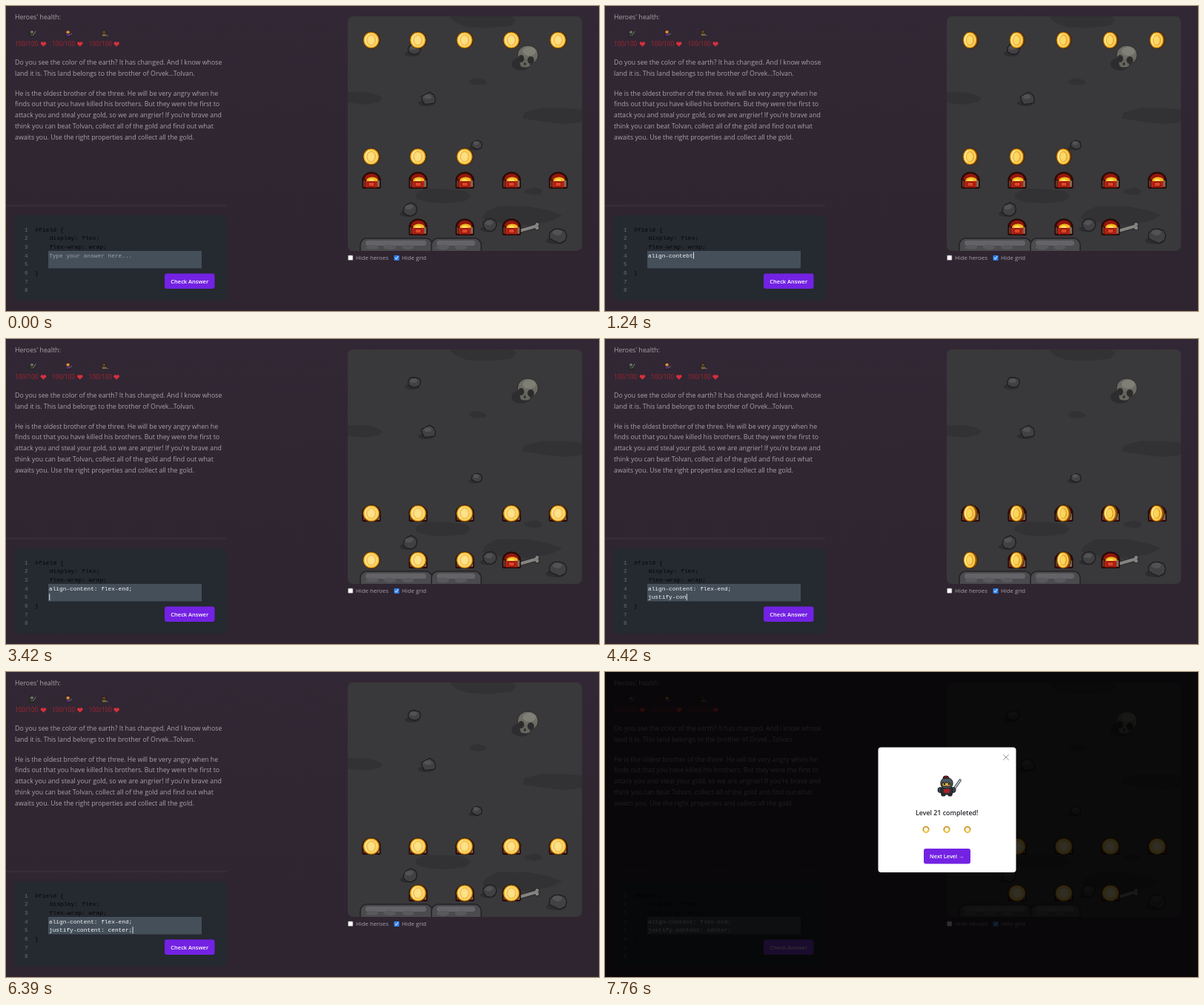
Animation, 800 px wide and 411 px high, one loop 7790 ms. Source, as an HTML page with a canvas:

```html
<!DOCTYPE html>
<html lang="en">
<head>
<meta charset="utf-8">
<title>Flex level</title>
<style>
html, body { margin: 0; width: 100%; height: 100%; overflow: hidden; background: #302632; }
canvas { display: block; width: 800px; height: 411px; }
</style>
</head>
<body>
<canvas id="stage" width="800" height="411"></canvas>
<script>
const LOOP = 7790;
const MOVE_DOWN = 2696, CENTER = 6205, CLICK = 6850, BURST = 7000, DONE = 7120;
const SANS = '"Open Sans", "Noto Sans", sans-serif';
const MONO = '"Liberation Mono", monospace';
const VIOLET = '#7322e3', INK = '#a8a2a9';
const TAU = Math.PI * 2;
const stage = document.getElementById('stage').getContext('2d');
let g = stage;

// ---------- helpers ----------
const clamp = v => Math.max(0, Math.min(1, v));

function seeded(seed) {
  return () => {
    seed = (seed * 1664525 + 1013904223) % 4294967296;
    return seed / 4294967296;
  };
}

function paint(fill, line, width = 1) {
  if (fill) { g.fillStyle = fill; g.fill(); }
  if (line) { g.strokeStyle = line; g.lineWidth = width; g.stroke(); }
}

function box(x, y, w, h, r, fill, line, width) {
  g.beginPath();
  g.roundRect(x, y, w, h, r);
  paint(fill, line, width);
}

function oval(x, y, rx, ry, fill, line, width, from = 0, to = TAU) {
  g.beginPath();
  g.ellipse(x, y, rx, ry, 0, from, to);
  paint(fill, line, width);
}

const dome = (x, y, rx, ry, fill, line) => oval(x, y, rx, ry, fill, line, 1, Math.PI, TAU);

function stroke(x0, y0, x1, y1, color, width) {
  g.beginPath();
  g.moveTo(x0, y0);
  g.lineTo(x1, y1);
  g.lineCap = 'round';
  paint(null, color, width);
}

function blob(x, y, rx, ry, seed, fill, line) {
  const rnd = seeded(seed), n = 9;
  g.beginPath();
  for (let i = 0; i < n; i++) {
    const a = i / n * TAU, r = .8 + .3 * rnd();
    g.lineTo(x + Math.cos(a) * rx * r, y + Math.sin(a) * ry * r);
  }
  g.closePath();
  g.lineJoin = 'round';
  paint(fill, line, 1.3);
}

function text(s, x, y, size, color, face = SANS, weight = 400) {
  g.font = `${weight} ${size}px ${face}`;
  g.fillStyle = color;
  g.fillText(s, x, y);
}

function at(x, y, draw) {
  g.save();
  g.translate(x, y);
  draw();
  g.restore();
}

// ---------- scenery ----------
const cellX = c => 493 + c * 63;
const cellY = r => 46 + r * 63;
const codeY = row => 303.7 + row * 11.65;

function rock(x, y, r) {
  oval(x - 3, y + r * .6, r * 1.1, r * .4, '#2d2c2e');
  blob(x, y, r, r * .85, x, '#414043', '#1d1c1f');
  blob(x - r * .1, y - r * .3, r * .6, r * .35, y, '#525154');
}

function skull() {
  at(702, 68, () => {
    oval(-7, 10, 13, 9, '#2d2c2e');
    box(-9, 1, 15, 14, 5, '#66655e', '#2b2a29');
    oval(2, -2, 14, 13, '#6c6b64', '#2b2a29');
    box(-8, 3, 13, 10, 4, '#66655e');
    oval(4, -7, 9, 6, '#807f76');
    oval(-7, 3, 4, 5, '#2d2c2d');
    oval(6, 5, 4.5, 5, '#2d2c2d');
    oval(-2, 10, 1.5, 2, '#2d2c2d');
  });
}

function wall() {
  for (const [x, w] of [[478, 97], [574, 67]]) {
    box(x, 311 + w % 5, w, 30, 9, '#4b4a4d', '#222124', 1.5);
    box(x + 7, 314 + w % 5, w - 15, 7, 4, '#646367');
    for (let i = 0; i < w / 25 - 1; i++) blob(x + 16 + i * 24, 325, 9, 3.5, x + i, '#59585c');
  }
}

function bone() {
  for (const [color, grow] of [['#28272a', 1], ['#858480', 0]]) {
    stroke(693, 303, 714, 297, color, 4 + grow * 2);
    for (const y of [294.5, 299]) oval(716.5, y, 2.4 + grow, 2.4 + grow, color);
  }
}

function chest(x, y) {
  at(x, y, () => {
    box(-12, -3, 24, 13.5, 1, '#3a0b07', '#1a0604');
    dome(0, -1, 12, 10, '#3a0b07', '#1a0604');
    dome(0, -1, 9.5, 8, '#96180d');
    dome(1, 1, 8, 5.5, '#f0b823');
    dome(0, 1, 4, 3, '#ffdf5c');
    box(-8, 1, 16, 8.5, 1, '#b92013');
    box(-4, 2.5, 8, 5.5, 1, '#df4527', '#5d0d08', .8);
    box(8, 0, 3, 9, 1, '#7d6a58');
    box(-11, 0, 2.5, 9, 1, '#64392c');
  });
}

function board() {
  g.save();
  box(461, 14, 316, 316, 7, '#39383a');
  g.clip();
  for (const [x, y, rx] of [[645, 19, 46], [479, 124, 31], [636, 102, 13], [745, 147, 48],
    [588, 256, 42], [695, 282, 58], [712, 250, 12]])
    blob(x, y, rx, 3 + rx * .18, x, '#323133');
  for (const [x, y, r] of [[551, 59, 9], [570, 125, 10], [635, 187, 7.5], [545, 274, 10], [653, 295, 9.5],
    [745, 309, 12]])
    rock(x, y, r);
  skull();
  wall();
  bone();
  g.restore();
  for (let c = 0; c < 5; c++) chest(cellX(c), cellY(3));
  for (let c = 1; c < 4; c++) chest(cellX(c), cellY(4));
}

function heart(x, y) {
  for (const side of [-1, 1]) oval(x + side * 1.7, y - 1, 2, 2, '#d92f3c');
  g.beginPath();
  g.moveTo(x - 3.6, y - .3);
  g.lineTo(x, y + 3.6);
  g.lineTo(x + 3.6, y - .3);
  paint('#d92f3c');
}

const story = [
  'Do you see the color of the earth? It has changed. And I know whose',
  'land it is. This land belongs to the brother of Orvek...Tolvan.'
];
const threat = [
  'He is the oldest brother of the three. He will be very angry when he',
  'finds out that you have killed his brothers. But they were the first to',
  "attack you and steal your gold, so we are angrier! If you're brave and",
  'think you can beat Tolvan, collect all of the gold and find out what',
  'awaits you. Use the right properties and collect all the gold.'
];
const paragraph = (lines, y) => lines.forEach((line, i) => text(line, 12, y + i * 14.75, 8.8, INK));

function scenery() {
  const sky = g.createLinearGradient(0, 0, 0, 411);
  sky.addColorStop(0, '#322734');
  sky.addColorStop(1, '#2e2530');
  g.fillStyle = sky;
  g.fillRect(0, 0, 800, 411);

  text("Heroes' health:", 12, 17.7, 8.8, INK);
  paragraph(story, 79);
  paragraph(threat, 120.5);
  for (let i = 0; i < 3; i++) {
    text('100/100', 12 + i * 49.7, 54, 8.3, '#a3262f');
    heart(50.5 + i * 49.3, 51.2);
  }

  box(0, 268.5, 297, 1, 0, '#40363f');
  box(11, 282, 287, 115, 6, '#252930');
  for (let i = 0; i < 8; i++) text(i + 1, 25, codeY(i), 7.8, '#686d73', MONO);
  ['#field {', '    display: flex;', '    flex-wrap: wrap;', '', '', '}'].forEach((line, i) =>
    text(line, 39, codeY(i), 8.1, '#050607', MONO));
  box(57, 330, 207, 23.5, 0, '#444f5a');

  board();
  box(461.5, 336, 6.5, 6.5, 1, '#ffffff', '#777177', .7);
  box(523.5, 336, 7, 7, 1, '#3080ee');
  stroke(525, 339.5, 526.5, 341, '#ffffff', 1);
  stroke(526.5, 341, 529, 337.5, '#ffffff', 1);
  text('Hide heroes', 472, 342, 7.8, INK);
  text('Hide grid', 534, 342, 7.8, INK);
}

const still = document.createElement('canvas');
still.width = 800;
still.height = 411;
g = still.getContext('2d');
scenery();
g = stage;

// ---------- moving parts ----------
const SPIN = 1600 / 3;

function coin(x, y, t) {
  const facing = Math.abs(Math.sin(Math.PI * (t - 105) / SPIN));
  const rx = Math.min(11.6, 13 * Math.max(.25, facing ** .35));
  const depth = (12 - rx) * .3;
  oval(x + depth, y, rx, 11, '#a35d0a', '#3d1c02');
  oval(x - depth, y, rx, 11, '#f3ad20', '#5a2e05', .8);
  oval(x - depth, y, rx * .8, 9, '#ffe06a');
  oval(x - depth * .6, y, rx * .62, 7.6, '#e79b1c');
  oval(x - depth * 1.2, y, rx * .45, 6.2, '#fbd14e');
  oval(x - depth, y, rx * .7, 8.2, null, '#fff3b5', 1.3, 2.2, 4.4);

  g.globalAlpha = facing ** 2;
  const shine = g.createRadialGradient(x, y, 0, x, y, 11);
  shine.addColorStop(0, '#fffef0');
  shine.addColorStop(.6, '#fff6c4');
  shine.addColorStop(1, 'rgba(255,214,80,.25)');
  oval(x, y, rx * .92, 10.4, shine);
  oval(x, y, rx * .66, 7.6, null, '#edb93c', .9);
  g.globalAlpha = 1;
}

function coins(t) {
  const down = t >= MOVE_DOWN;
  const shift = t >= CENTER ? 1 : 0;
  for (let c = 0; c < 5; c++) coin(cellX(c), cellY(down ? 3 : 0), t);
  for (let c = 0; c < 3; c++) coin(cellX(c + shift), down ? cellY(4) : 203, t);
}

const outfits = [['#63705a', '#39452f'], ['#d58a42', '#51306e'], ['#5d4326', '#756b3e']];

function heroes(t) {
  outfits.forEach(([head, body], i) => at(35 + i * 48.6, 37 + .3 * Math.sin(t / 150 + i), () => {
    box(-3, -1, 6, 5, 1.5, body, '#17131a', .8);
    oval(0, -2, 2.8, 2.5, head, '#17131a', .8);
    stroke(2, 2, 5, 3 * i - 3, '#8f8f92', .8);
  }));
}

// start, pace, keys ('<' deletes)
const keysTyped = [
  [280, 75, 'align-contebt'], [1430, 80, '<<'], [1640, 88, 'nt: flex-end;'], [3250, 0, '\n'],
  [3560, 84, 'justify-con'], [4540, 150, 'tent: '], [5780, 85, 'center;']
];

function typing(t) {
  let s = '', last = 0;
  for (const [start, pace, keys] of keysTyped)
    [...keys].forEach((k, i) => {
      const when = start + pace * i;
      if (t < when) return;
      s = k === '<' ? s.slice(0, -1) : s + k;
      last = when;
    });
  if (!s) return text('Type your answer here...', 58, codeY(3), 7.8, '#9aa2a9', MONO);
  const lines = s.split('\n'), row = lines.length - 1;
  lines.forEach((line, i) => text(line, 58, codeY(3 + i), 7.8, '#f4f5f6', MONO));
  if (t < CLICK && (t - last) % 1060 < 530)
    g.fillRect(58.3 + g.measureText(lines[row]).width, codeY(3 + row) - 7, .9, 9);
}

const rnd = seeded(77);
const tints = ['#8d20ff', '#3294ee', '#ffe536', '#e62c3f', '#ff9a22', '#82d34c', '#9a2cff', '#ffe94d'];
const bits = Array.from({ length: 95 }, () => ({
  aim: (rnd() - .5) * 1.3,
  speed: 13 + rnd() * 28,
  turn: rnd() * TAU,
  tint: tints[Math.floor(rnd() * tints.length)]
}));

function confetti(t) {
  if (t < BURST) return;
  const k = (t - BURST) / 17;
  const reach = 10 * (1 - .9 ** k);
  g.globalAlpha = 1 - clamp((t - DONE) / 400);
  for (const b of bits) {
    const x = 459 + Math.sin(b.aim) * b.speed * reach;
    const y = 224 - Math.cos(b.aim) * b.speed * reach + 1.8 * k;
    at(x, y, () => {
      g.rotate(b.turn + k * .1);
      oval(0, 0, 2.3, .6 + 1.1 * Math.abs(Math.cos(b.turn * 5 + k * .1)), b.tint);
    });
  }
  g.globalAlpha = 1;
}

function knight() {
  const dark = '#14161a';
  at(461, 154, () => {
    stroke(9, 5, 18, -8, '#39424a', 3.6);
    stroke(9, 5, 18, -8, '#b9c6cf', 1.8);
    for (const side of [-1, 1]) {
      box(side * 4.5 - 2.5, 8, 5, 5, 1, '#333940', dark);
      oval(side * 9, 5, 3, 3.5, '#424a52', dark);
    }
    box(-8, 1, 16, 10, 3, '#2c3138', dark);
    box(-4, 2, 8, 7, 2, '#a5222a');
    oval(-1, -11, 4, 3, '#8f1d25', dark);
    box(-8, -11, 16, 14, 6, '#4c5963', dark);
    box(-6, -5, 11, 5, 1, '#d9ad3d', dark);
    for (const x of [-4, 2]) box(x, -4, 2, 2, 0, dark);
  });
}

function dialog(t) {
  if (t < DONE) return;
  const show = 1 - (1 - clamp((t - DONE) / 300)) ** 3;
  g.fillStyle = `rgba(0,0,0,${.81 * show})`;
  g.fillRect(0, 0, 800, 411);
  g.globalAlpha = show;
  at(461.5, 186, () => {
    g.scale(.9 + .1 * show, .9 + .1 * show);
    g.translate(-461.5, -186);
    box(368.5, 101.5, 186, 168.5, 4, '#ffffff');
    for (const d of [-3.5, 3.5]) stroke(541 - d, 111.5, 541 + d, 118.5, '#8d8d91', .9);
    knight();
    text('Level 21 completed!', 419, 192.8, 8.85, '#25242a', SANS, 600);
    for (let i = 0; i < 3; i++) {
      oval(433 + i * 28, 212.2, 3.7, 3.7, '#fff9dd', '#c98a1d', 1.7);
      oval(433 + i * 28, 212.2, 3.5, 3.5, null, '#f4cf4e', 1.5, .2, 2.6);
    }
    box(430, 238, 63, 20.5, 3, VIOLET);
    text('Next Level →', 438, 251, 7.4, '#ffffff', SANS, 600);
  });
  g.globalAlpha = 1;
}

function frame(now) {
  const t = now % LOOP;
  g.drawImage(still, 0, 0);
  heroes(t);
  coins(t);
  typing(t);
  box(214, 360.5, 67.5, 20.5, 3, t < CLICK ? VIOLET : '#8540ee');
  text('Check Answer', 222.3, 373.6, 7.5, '#ffffff', SANS, 600);
  confetti(t);
  dialog(t);
}

const begin = performance.now();
function tick() {
  frame(performance.now() - begin);
  requestAnimationFrame(tick);
}
tick();
</script>
</body>
</html>
```
